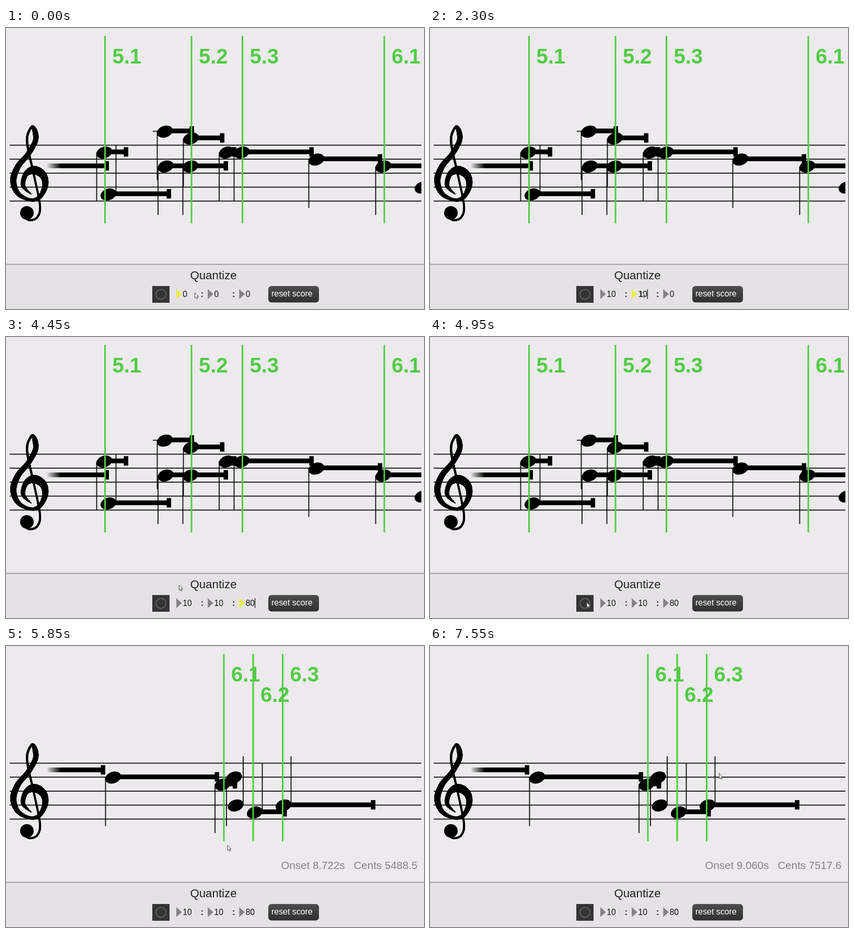
An HTML page for the animation above (8000 ms loop, 800 by 538 pixels).

```html
<!DOCTYPE html>
<html lang="en">
<head>
<meta charset="utf-8">
<title>Quantize</title>
<style>
  html, body { margin: 0; width: 100%; height: 100%; overflow: hidden; background: #eceaec; }
  svg { display: block; width: 800px; height: 538px; font-family: "Liberation Sans", Arial, sans-serif; }
  .thin { stroke: #0a0a0a; stroke-width: 1.8; }
  .beat { fill: #52cb46; font: bold 40px "Liberation Sans", Arial, sans-serif; }
  .field { font-size: 15.6px; fill: #111; }
  #clef { stroke: #000; stroke-linecap: round; }
</style>
</head>
<body>
<svg viewBox="0 0 800 538" xmlns="http://www.w3.org/2000/svg">
  <defs>
    <linearGradient id="fade" gradientUnits="userSpaceOnUse" x1="77" x2="105" y1="0" y2="0">
      <stop offset="0" stop-opacity="0"/><stop offset="1"/>
    </linearGradient>
    <linearGradient id="button" x2="0" y2="1">
      <stop offset="0" stop-color="#4d4d4d"/><stop offset="1" stop-color="#303030"/>
    </linearGradient>
    <clipPath id="page"><rect width="795" height="452"/></clipPath>
  </defs>
  <rect width="800" height="538" fill="#eceaec"/>
  <g id="staff"></g>
  <g id="clef"><circle cx="40" cy="354" r="13" stroke="none"/></g>
  <g id="before" clip-path="url(#page)"></g>
  <g id="after" clip-path="url(#page)"></g>
  <text id="readout" x="787.5" y="426.5" text-anchor="end" font-size="20.5" fill="#858385"></text>
  <rect y="452" width="800" height="86" fill="#e4e2e4"/>
  <rect y="451.5" width="800" height="2" fill="#a09ea0"/>
  <text x="397" y="481.3" text-anchor="middle" font-size="22.3" fill="#222">Quantize</text>
  <rect x="280" y="494" width="33" height="32" fill="#343434"/>
  <circle cx="296.5" cy="510" r="9.5" fill="none" stroke="#606060" stroke-width="2"/>
  <g id="fields"></g>
  <rect x="502" y="494" width="97" height="31.5" rx="6" fill="url(#button)"/>
  <text x="508" y="514.2" font-size="15.9" fill="#fff">reset score</text>
  <g id="cursor" stroke="#444" fill="#fff" stroke-linejoin="round">
    <path id="arrow" d="M.5 .5V10.5L2.7 8.4L4.4 12L6 11.2L4.4 7.7H7.4Z"/>
    <path id="resize" d="M-6 0L-3 -3V-1H3V-3L6 0L3 3V1H-3V3Z"/>
  </g>
</svg>
<script>
const LOOP = 8000, STEP = 50, CLICK = 5150;
const $ = id => document.getElementById(id);
const show = (el, on) => el.setAttribute("visibility", on ? "visible" : "hidden");

// Staff steps count white keys down from the top line, F5.
const staffY = step => 224.4 + step * 13.37;
const staffStep = y => (y - staffY(0)) / 13.37;

function add(parent, tag, attrs, text) {
  const el = document.createElementNS("http://www.w3.org/2000/svg", tag);
  for (const key in attrs) el.setAttribute(key, attrs[key]);
  if (text !== undefined) el.textContent = text;
  return parent.appendChild(el);
}

const line = (g, x1, y1, x2, y2) => add(g, "line", { class: "thin", x1, y1, x2, y2 });

function bar(g, from, to, step, fill = "#000") {
  const y = staffY(step) - 0.6;
  add(g, "rect", { x: from, y: y - 4.5, width: to - from - 4, height: 9, fill });
  add(g, "rect", { x: to - 8.5, y: y - 9, width: 8.5, height: 18 });
}

// Stems span an octave: up on the right for low notes, down on the left otherwise.
function note(g, [x, step, end]) {
  const y = staffY(step) + 0.7, side = step > 4 ? 1 : -1;
  if (end) bar(g, x, end, step);
  if (step < -1) line(g, x - 23, staffY(step), x + 23, staffY(step));
  line(g, x + side * 14.5, y, x + side * 14.5, staffY(step - side * 7));
  add(g, "ellipse", { rx: 15.5, ry: 11, transform: `translate(${x} ${y}) rotate(-20)` });
}

// A label that would touch its neighbour drops to the second row.
function beats(g, marks) {
  let lastX = -Infinity, row = 0;
  for (const [label, x] of Object.entries(marks)) {
    row = x - lastX < 60 ? 1 - row : 0;
    lastX = x;
    add(g, "rect", { class: "beat", x: x - 1.5, y: 15, width: 3, height: 359 });
    add(g, "text", { class: "beat", x: x + 14, y: 68 + row * 39.3 }, label);
  }
}

function score(g, tailEnd, tailStep, notes, marks) {
  bar(g, 77, tailEnd, tailStep, "url(#fade)");
  notes.forEach(n => note(g, n));
  beats(g, marks);
}

// A pen stroke through [x, y, radius] points, smoothed by Catmull-Rom.
function penStroke(g, points, pieces = 14) {
  const at = i => points[Math.min(points.length - 1, Math.max(0, i))];
  const sample = u => {
    const i = Math.min(points.length - 2, Math.floor(u)), t = u - i;
    return at(i).map((b, axis) => {
      const [a, c, d] = [at(i - 1)[axis], at(i + 1)[axis], at(i + 2)[axis]];
      return b + t / 2 * (c - a + t * (2 * a - 5 * b + 4 * c - d + t * (3 * (b - c) + d - a)));
    });
  };
  for (let n = 0; n < (points.length - 1) * pieces; n++) {
    const [x1, y1, r] = sample(n / pieces), [x2, y2] = sample((n + 1) / pieces);
    add(g, "line", { x1, y1, x2, y2, "stroke-width": 2 * r });
  }
}

for (let i = 0; i < 5; i++) line($("staff"), 7, staffY(2 * i), 795, staffY(2 * i));

penStroke($("clef"), [
  [48, 318, 1], [33, 302, 4], [38, 280, 5], [54, 272, 8], [71, 282, 7], [75, 302, 5.5],
  [64, 324, 4], [46, 329, 3], [23, 317, 4.5], [14, 292, 6], [23, 265, 5.5], [42, 242, 5],
  [56, 217, 5], [56, 200, 5], [50, 189, 2.5], [41, 206, 2.2], [42, 230, 2.2],
  [54, 284, 2], [65, 340, 2], [60, 362, 2], [46, 368, 2], [34, 362, 2]
]);

score($("before"), 197, 3, [
  [188, 1, 234], [196, 7, 316], [304, -2, 360], [354, -1, 418], [305.5, 3, 358], [353, 3, 425],
  [422.5, 1, 441], [451, 1, 589], [594, 2, 720], [722, 3, 820], [797, 6]
], { "5.1": 189.5, "5.2": 355, "5.3": 452.5, "6.1": 724 });

score($("after"), 190, 1, [
  [205, 2, 408], [414.5, 3, 442.5], [436.5, 2], [439.5, 6], [476, 7, 537.5], [531, 6, 707]
], { "6.1": 417, "6.2": 473, "6.3": 529.5 });

// Each field is active from one click to the next; every key adds a digit.
const fields = [
  { digits: "10", keys: [600, 850], active: [0, 1400] },
  { digits: "10", keys: [1700, 1850], active: [1400, 2700] },
  { digits: "80", keys: [3400, 3500], active: [2700, 4500] }
];
fields.forEach((f, i) => {
  const x = 326 + i * 60.2, g = $("fields");
  f.textX = x + 12.3;
  f.mark = add(g, "path", { d: `M${x} 500V519L${x + 10.5} 509.5Z` });
  f.text = add(g, "text", { class: "field", x: f.textX, y: 514.5 });
  f.caret = add(g, "rect", { y: 500, width: 1.2, height: 19, fill: "#111" });
  if (i) add(g, "text", { class: "field", "font-weight": "bold", x: x - 13.5, y: 515 }, ":");
});

const home = { x: 361, y: 506.5 };
const moves = [
  { from: 1100, to: 1300, x: 404, y: 504 },
  { from: 2300, to: 2600, x: 465, y: 508 },
  { from: 3950, to: 4400, x: 331, y: 474.5 },
  { from: 4650, to: 4950, x: 299.5, y: 507.5 },
  { from: 5500, to: 6100, x: 512, y: staffY(4.941), power: 1 },
  { from: 6100, to: 6400, x: 553, y: staffY(1.412) }
];

function pointer(t) {
  let { x, y } = home;
  for (const m of moves) {
    const k = Math.min(1, Math.max(0, (t - m.from) / (m.to - m.from)));
    const eased = 1 - (1 - k) ** (m.power || 2);
    x += (m.x - x) * eased;
    y += (m.y - y) * eased;
  }
  return { x, y };
}

function cents(y) {
  const scale = [0, 2, 4, 5, 7, 9, 11];
  const key = d => 6000 + 1200 * Math.floor(d / 7) + 100 * scale[(d % 7 + 7) % 7];
  const degree = 10 - staffStep(y), low = Math.floor(degree);
  return key(low) + (key(low + 1) - key(low)) * (degree - low);
}

const latest = (times, t) => Math.max(0, ...times.filter(time => time <= t));

function draw(t) {
  const quantized = t >= CLICK;
  show($("before"), !quantized);
  show($("after"), quantized);

  // Typing hides the pointer until it moves again.
  const lastKey = latest(fields.flatMap(f => f.keys), t + STEP);
  const pointing = latest(moves.map(m => m.from), t) >= lastKey;

  for (const f of fields) {
    const active = t >= f.active[0] && t < f.active[1];
    const typed = f.keys.filter(key => key <= t).length;
    f.mark.setAttribute("fill", active ? "#e6ee45" : "#848284");
    f.text.textContent = f.digits.slice(0, typed) || "0";
    f.caret.setAttribute("x", f.textX + typed * 8.6);
    show(f.caret, active && typed && (pointing || t - lastKey < 250));
  }

  const { x, y } = pointer(t);
  const overBeat = quantized && y < 373 && Math.abs(x - 529.5) < 9;
  $("cursor").setAttribute("transform", `translate(${x} ${y})`);
  show($("arrow"), pointing && !overBeat);
  show($("resize"), pointing && overBeat);

  // The readout trails the pointer by one step.
  const seen = pointer(t - STEP);
  const onset = 9.06 - (553 - seen.x) * 0.0022927;
  $("readout").textContent = quantized && seen.y < 452
    ? `Onset ${onset.toFixed(3)}s\u00a0\u00a0\u00a0Cents ${cents(seen.y).toFixed(1)}` : "";
}

const start = performance.now();
function tick() {
  const t = (performance.now() - start) % LOOP;
  draw(Math.floor(t / STEP) * STEP);
  requestAnimationFrame(tick);
}
tick();
</script>
</body>
</html>
```
